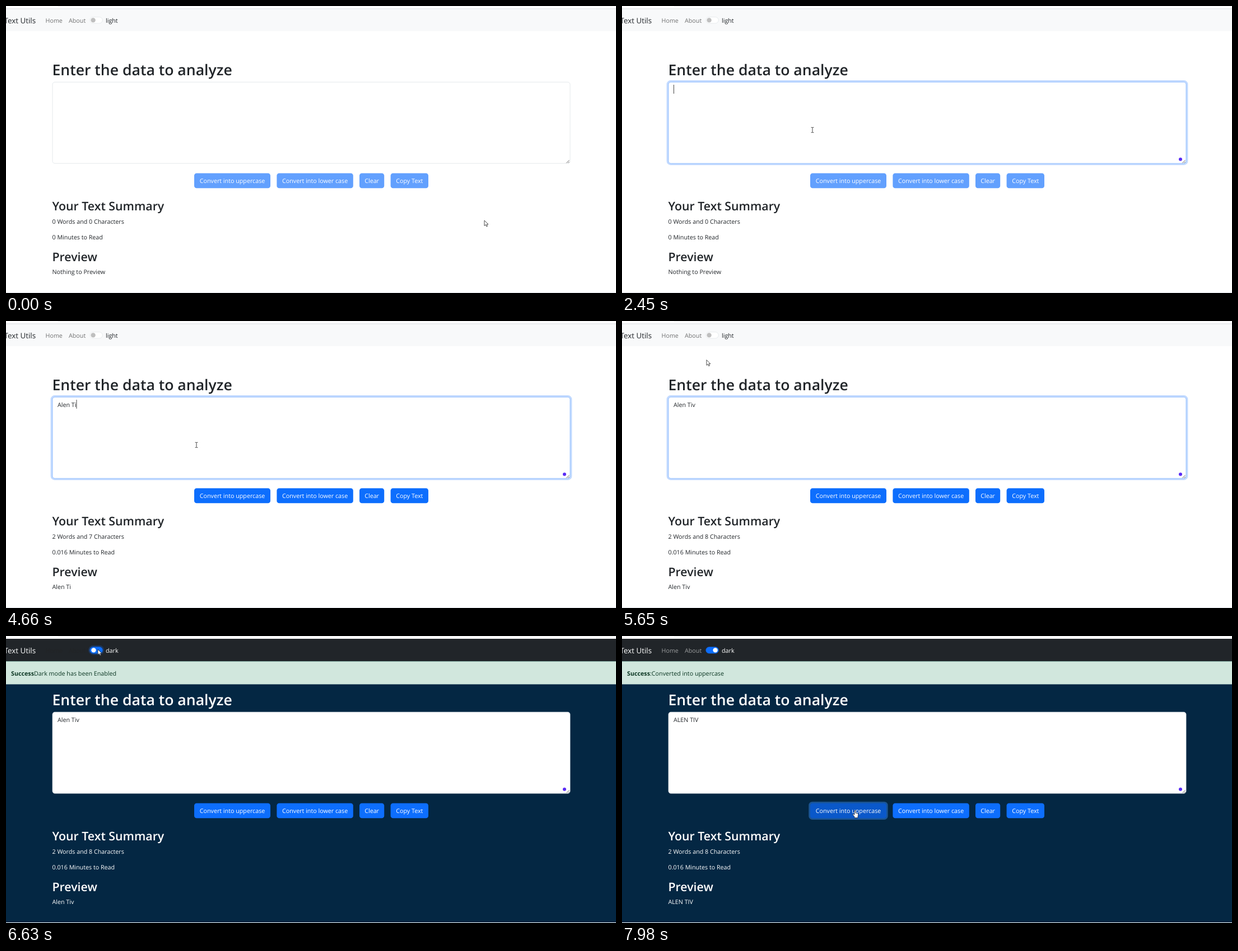
An HTML page for the animation above (8000 ms loop, 1089 by 514 pixels).

```html
<!DOCTYPE html>
<html lang="en">
<head>
<meta charset="utf-8">
<title>Text tools</title>
<style>
  html, body { margin: 0; width: 100%; height: 100%; overflow: hidden; background: #fff; }
  svg { display: block; width: 100vw; height: 100vh; }
  text { font: 10.72px "Open Sans", "Noto Sans", sans-serif; white-space: pre; text-rendering: geometricPrecision; }
  .h1 { font-size: 26.6px; font-weight: 600; }
  .h2 { font-size: 21.3px; font-weight: 600; }
  .brand { font-size: 13.4px; }
  .bold { font-weight: 700; }
  .mid { text-anchor: middle; }
</style>
</head>
<body>
<svg id="stage" viewBox="0 0 1089 514"></svg>
<script>
const LOOP = 8000;
const NAME = "Alen Tiv";
const KEY_TIMES = [3600, 3730, 3800, 4020, 4060, 4410, 4660, 4730];
const FOCUS = 1400, BLUR = 6420, PRESS = 6400, DARK = 6630, CLICK = 7780, UPPER = 7910;

// Pointer hot spot: time, x, y
const PATH = [
  [120, 854, 384], [400, 600, 240], [600, 400, 158], [730, 351, 177],
  [1010, 352, 177], [1870, 352, 177], [2050, 372, 215], [2250, 360, 262], [2450, 340, 222],
  [5250, 340, 222], [5450, 205, 125], [5650, 151, 70], [5850, 138, 10], [6050, 144, 8],
  [6130, 146, 11], [6400, 163, 20], [6540, 163, 20], [6630, 164, 24], [6750, 164, 24],
  [6890, 199, 88], [7120, 320, 215], [7320, 440, 325], [7430, 464, 342],
  [7560, 421, 337], [7700, 416, 312]
];

const stage = document.getElementById("stage");

function add(tag, attrs, parent = stage) {
  const el = document.createElementNS("http://www.w3.org/2000/svg", tag);
  set(el, attrs);
  parent.appendChild(el);
  return el;
}
function set(el, attrs) {
  for (const k in attrs) el.setAttribute(k, attrs[k]);
}
function rect(x, y, width, height, attrs) {
  return add("rect", { x, y, width, height, ...attrs });
}
function label(x, y, str, cls = "") {
  const el = add("text", { x, y, class: cls });
  el.textContent = str;
  return el;
}
function write(el, str) {
  if (el.textContent !== str) el.textContent = str;
}
function show(el, on) {
  el.setAttribute("visibility", on ? "visible" : "hidden");
}
const ramp = (t, from, span) => Math.min(1, Math.max(0, (t - from) / span));
const ease = p => p * p * (3 - 2 * p);
const mix = (a, b, p) => `rgb(${a.map((v, i) => Math.round(v + (b[i] - v) * p))})`;

// Page and navigation bar
const page = rect(0, 45, 1089, 468, {});
const nav = rect(0, 5, 1089, 40, {});
const topLine = rect(0, 4.5, 1089, 1, { fill: "#d9dce0" });
rect(93, 0, 996, 0.7, { fill: "#ececec" });
const bottomLine = rect(0, 513, 1089, 1, {});
const brand = label(-3.5, 31.2, "Text Utils", "brand");
const links = [label(70.5, 30, "Home"), label(112, 30, "About")];
const mode = label(178, 30, "light");

const toggleRing = rect(147.2, 16.8, 28, 17, { rx: 8.5 });
const toggle = rect(149.9, 19.8, 22.4, 11.2, { rx: 5.6, "stroke-width": 0.7 });
const knob = add("circle", { cy: 25.4, r: 4.2 });

// Alert
const alertBox = rect(0, 45.5, 1089, 41, { fill: "#d1e7dd" });
const alertLine = rect(0, 45.5, 1089, 0.7, { fill: "#a3cfbb" });
const alertHead = label(9, 71, "Success", "bold");
const alertText = label(50, 71, "");
set(alertHead, { fill: "#0a3622" });
set(alertText, { fill: "#0a3622" });

// Form
const title = label(82.5, 124, "Enter the data to analyze", "h1");
const ring = rect(82.5, 136, 925, 146, { rx: 4.3, fill: "none", stroke: "#0d6efd" });
const box = rect(83, 136.3, 924, 145.6, { rx: 4.3, fill: "#fff" });
const dot = add("circle", { cx: 997, cy: 274.5, r: 3, fill: "#5a2cf5" });
add("path", { d: "M1000.5 281.2l5-5M1003.5 281.2l2-2", stroke: "#555", "stroke-width": 0.9 });
const typed = label(92, 153.5, "");
set(typed, { fill: "#212529" });
const caret = rect(92, 141, 0.9, 16, { fill: "#333" });

const buttonRing = rect(333.3, 296.7, 141.4, 32.2, { rx: 6.5, fill: "#1a5596" });
const buttons = [
  [336, 136, "Convert into uppercase"], [483.4, 136.4, "Convert into lower case"],
  [631, 44.2, "Clear"], [686.6, 67.4, "Copy Text"]
].map(([x, w, str]) => {
  const el = rect(x, 299.5, w, 26.8, { rx: 4.3 });
  set(label(x + w / 2, 317.3, str, "mid"), { fill: "#fff" });
  return el;
});

// Summary
const heads = [label(82.5, 366, "Your Text Summary", "h2"), label(82.5, 456.5, "Preview", "h2")];
const counts = label(82.5, 389.5, "");
const minutes = label(82.5, 418, "");
const preview = label(82.5, 480, "");
const inked = [title, ...heads, counts, minutes, preview, brand, mode];

// Pointer shapes, hot spot at 0,0
const glow = add("circle", { cx: 350.5, cy: 177, r: 8.8, fill: "#ffff6a" });
const pointer = add("g", {});
const shapes = {
  arrow: add("path", {
    d: "M0 0V9.6L2.3 7.6L3.9 11L5.5 10.3L4 7H7Z",
    fill: "#fff", stroke: "#222", "stroke-width": 0.8, "stroke-linejoin": "round"
  }, pointer),
  beam: add("path", {
    d: "M-2.4 -4.6H-.6L0 -4L.6 -4.6H2.4M0 -4V4M-2.4 4.6H-.6L0 4L.6 4.6H2.4",
    fill: "none", stroke: "#333", "stroke-width": 0.9
  }, pointer),
  hand: add("path", {
    d: "M-1 1Q0 -.8 1 1V5L5 6Q6 6.4 5.8 8L5 11V13.5H-1V11.5L-4 8Q-4.2 6.4 -2.5 7L-1 8.2Z",
    fill: "#fff", stroke: "#222", "stroke-width": 0.7, "stroke-linejoin": "round"
  }, pointer)
};

function pointerAt(t) {
  const i = PATH.findIndex(p => p[0] > t);
  if (i === 0) return PATH[0].slice(1);
  if (i < 0) return PATH[PATH.length - 1].slice(1);
  const [a, b] = [PATH[i - 1], PATH[i]];
  const p = (t - a[0]) / (b[0] - a[0]);
  return [1, 2].map(k => a[k] + (b[k] - a[k]) * p);
}
const inside = (x, y, l, t, r, b) => x >= l && x <= r && y >= t && y <= b;

function drawPointer(t) {
  const [x, y] = pointerAt(t);
  const overButton = t > DARK && inside(x, y, 336, 299, 472, 326);
  const overText = inside(x, y, 83, 136, 1007, 282) || inside(x, y, 83, 98, 405, 131);
  const kind = overButton ? "hand" : overText ? "beam" : "arrow";
  set(pointer, { transform: `translate(${x.toFixed(2)} ${y.toFixed(2)})` });
  for (const k in shapes) show(shapes[k], k === kind);
  set(glow, { opacity: t < 1330 ? 0 : 1 - ramp(t, 1530, 200) });
  return overButton;
}

function drawToggle(t, dark) {
  const pressed = t >= PRESS && !dark;
  const slide = ease(ramp(t, DARK - 25, 150));
  show(toggleRing, t >= PRESS && t < CLICK);
  set(toggleRing, { fill: dark ? "#1c375e" : "#b4cbec" });
  set(toggle, {
    fill: dark ? "#0d6efd" : pressed ? "#c9d8ee" : "#fff",
    stroke: dark ? "#0d6efd" : pressed ? "#79a5e5" : "#dee2e6"
  });
  set(knob, {
    cx: 155.6 + (dark ? slide * 11 : 0),
    fill: dark ? "#fff" : pressed ? "#6c97d8" : "#bfbfbf"
  });
}

function drawTheme(t, dark) {
  set(page, { fill: dark ? "#042743" : "#fff" });
  set(nav, { fill: dark ? "#212529" : "#f8f9fa" });
  set(bottomLine, { fill: dark ? "#fff" : "#dee2e6" });
  show(topLine, !dark);
  for (const el of inked) set(el, { fill: dark ? "#fff" : "#212529" });
  const shade = Math.round(255 * ramp(t, DARK - 20, 150));
  for (const el of links) set(el, { fill: `rgba(${shade},${shade},${shade},.55)` });
  write(mode, dark ? "dark" : "light");
  for (const el of [alertBox, alertLine, alertHead, alertText]) show(el, dark);
  write(alertText, t < UPPER ? "Dark mode has been Enabled" : ":Converted into uppercase");
}

function drawText(t) {
  const size = KEY_TIMES.filter(k => k <= t).length;
  const raw = NAME.slice(0, size);
  const str = t < UPPER ? raw : raw.toUpperCase();
  const words = str.split(" ").filter(Boolean).length;
  write(typed, str);
  write(preview, str || "Nothing to Preview");
  write(counts, `${words} Words and ${size} Characters`);
  write(minutes, `${words ? (words * 0.008).toFixed(3) : 0} Minutes to Read`);

  const since = size ? KEY_TIMES[size - 1] : 1330;
  const lit = Math.floor((t - since) / 530) % 2 === 0;
  show(caret, t >= 1330 && t < BLUR && lit);
  set(caret, { x: 92 + (size ? typed.getComputedTextLength() : 0) });
  return size;
}

function drawForm(t, size, hover) {
  const focus = ease(ramp(t, FOCUS, 150)) * (1 - ease(ramp(t, BLUR, 150)));
  set(ring, { "stroke-width": 5.8 * focus, "stroke-opacity": 0.25 * focus });
  set(box, { stroke: mix([222, 226, 230], [134, 183, 254], focus), "stroke-width": 0.8 });
  show(dot, t >= 1650);
  buttons.forEach((el, i) => set(el, {
    fill: !size ? "#62a0fe" : i === 0 && hover ? (t < CLICK ? "#0b5ed7" : "#0a58ca") : "#0d6efd"
  }));
  show(buttonRing, t >= CLICK);
}

function render(t) {
  const dark = t >= DARK;
  drawTheme(t, dark);
  drawToggle(t, dark);
  const size = drawText(t);
  const hover = drawPointer(t);
  drawForm(t, size, hover);
}

const start = performance.now();
function tick() {
  render((performance.now() - start) % LOOP);
  requestAnimationFrame(tick);
}
tick();
</script>
</body>
</html>
```
